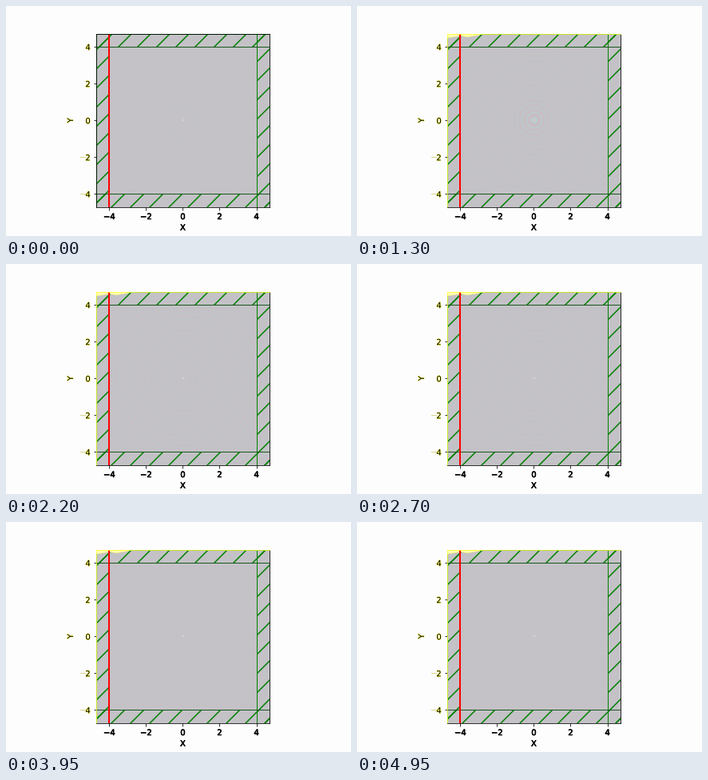
Write a matplotlib script that moves like this. It is 432 px wide and 288 px high and loops after 5000 ms.

```python
import matplotlib.pyplot as plt
import numpy as np
from matplotlib.animation import FuncAnimation
from matplotlib.patches import Polygon, Rectangle
from matplotlib.patheffects import withStroke

W, H, DPI = 432, 288, 72
FRAMES, STEP = 100, 50
HALF, INNER = 4.72, 4.0         # outer edge of the cell, inner edge of the absorber
SIZE = 217.44                   # side of the square axes in pixels
CX, CY = 221.4, 144.72          # its centre, measured from the lower left

BASE = np.array([196, 194, 199]) / 255
TINT = np.array([0.10, -0.10, -0.12])   # positive field leans red
GREEN, YELLOW = "#008000", "#ffff30"

plt.rcParams.update({"font.family": "DejaVu Sans", "hatch.linewidth": 1.5})

fig = plt.figure(figsize=(W / DPI, H / DPI), dpi=DPI, facecolor="#fdfdfe")
ax = fig.add_axes([(CX - SIZE / 2) / W, (CY - SIZE / 2) / H, SIZE / W, SIZE / H])

grid = np.linspace(-HALF, HALF, 217)
radius = np.hypot(*np.meshgrid(grid, grid))


def field(t):
    """A faint train of fine rings leaving the centre, t in seconds."""
    since = t - 1.3
    pulse = np.exp(-((since - radius / 4.6) / 0.28) ** 2)
    wave = np.cos(2 * np.pi * (radius / 0.27 - 4 * since))
    return pulse * wave / np.sqrt(1 + 60 * radius)


def colours(t):
    glow = 0.12 * np.exp(-(radius / 0.045) ** 2)
    rgb = BASE + 1.3 * field(t)[..., None] * TINT + glow[..., None]
    return np.clip(rgb, 0, 1)


def outline(text, color, width):
    text.set_path_effects([withStroke(linewidth=width, foreground=color)])


image = ax.imshow(colours(0), extent=[-HALF, HALF, -HALF, HALF], origin="lower",
                  interpolation="bilinear", aspect="auto", zorder=0)

# Pale sliver along the upper left edge
sliver = Polygon([(-HALF, HALF), (-2.75, HALF), (-3.1, 4.62), (-3.6, 4.54),
                  (-4.0, 4.6), (-4.3, 4.55), (-HALF, 4.48)],
                 facecolor="#ffffb4", edgecolor="#f6f27a", lw=0.6, zorder=2.1)
ax.add_patch(sliver)

# Hatched absorbing layers
depth, full = HALF - INNER, 2 * HALF
for x, y, w, h in [(-HALF, -HALF, depth, full), (INNER, -HALF, depth, full),
                   (-HALF, INNER, full, depth), (-HALF, -HALF, full, depth)]:
    ax.add_patch(Rectangle((x, y), w, h, facecolor="none", edgecolor=GREEN,
                           hatch="/", lw=1))
for y in (-INNER, INNER):
    ax.plot([-HALF, HALF], [y, y], color="#1d4f22", lw=0.8)
ax.plot([-INNER, -INNER], [-HALF, HALF], color="red", lw=2, zorder=2.2)

ax.set(xlim=(-HALF, HALF), ylim=(-HALF, HALF))
ticks = [-4, -2, 0, 2, 4]
ax.set_xticks(ticks)
ax.set_yticks(ticks, [str(abs(v)) for v in ticks])
ax.tick_params(labelsize=10, length=3.5, width=0.8, pad=3.5)
for label in ax.get_xticklabels():
    outline(label, "black", 0.6)
for label in ax.get_yticklabels():
    outline(label, YELLOW, 0.9)

# Thin pale minus signs on the vertical axis
for value in (-4, -2):
    y = (CY + value * SIZE / full) / H
    fig.add_artist(plt.Line2D([92.5 / W, 98.5 / W], [y, y], lw=1, color="#d8d48a"))

centred = dict(size=10, ha="center", va="center")
outline(fig.text(CX / W, 10.3 / H, "X", **centred), "black", 0.6)
outline(fig.text(81 / W, CY / H, "Y", rotation=90, **centred), YELLOW, 0.9)


def draw(i):
    started = i > 0
    image.set_data(colours(i * STEP / 1000))
    sliver.set_visible(started)
    for side in ("top", "left"):
        ax.spines[side].set_color(YELLOW if started else "black")
    return image, sliver


anim = FuncAnimation(fig, draw, frames=FRAMES, interval=STEP, repeat=True,
                     repeat_delay=0, blit=False)
plt.show()
```
